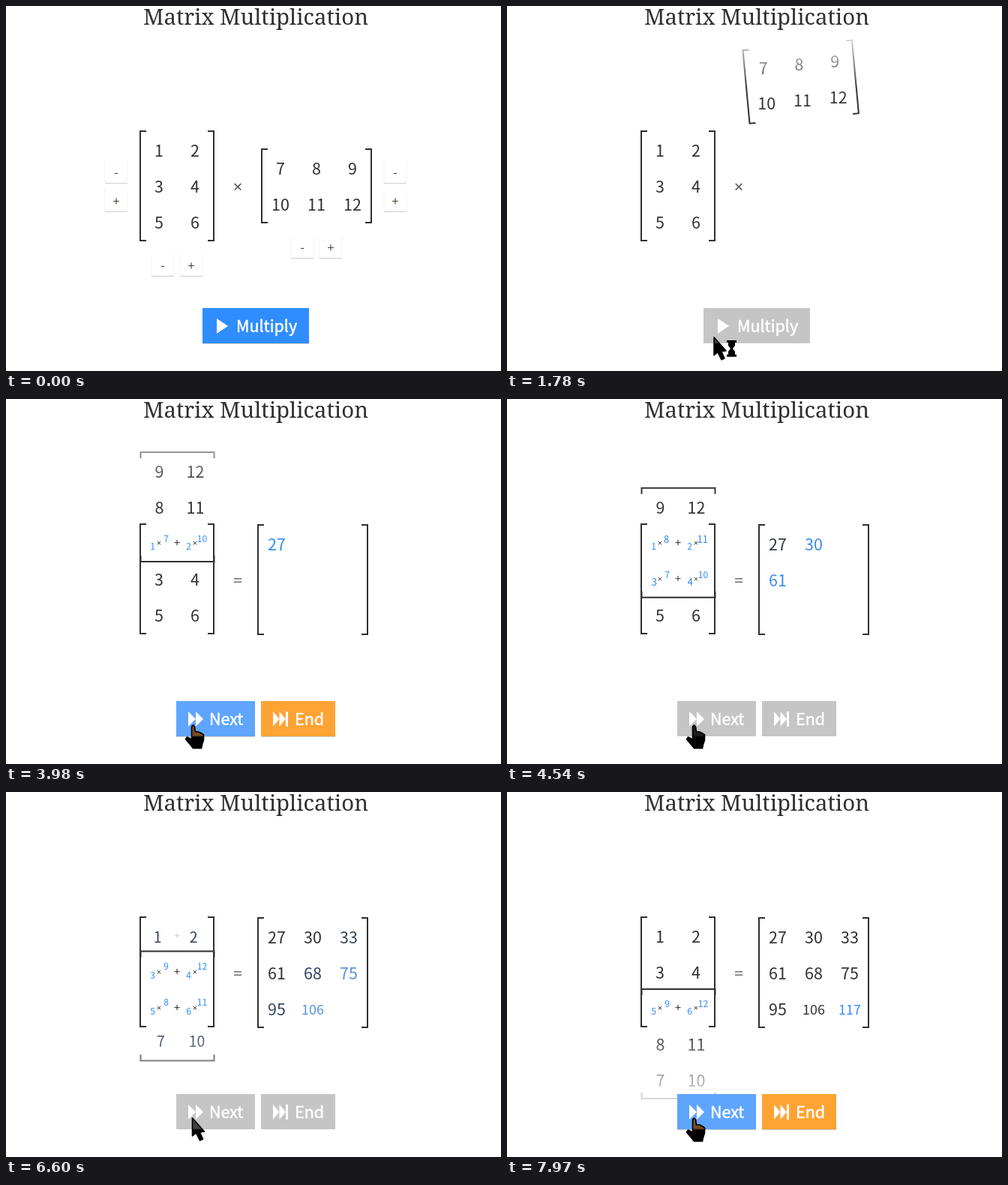
Recreate the animation shown at these times as an HTML page with a canvas. Size 660 by 487 pixels, loop 8000 ms.

```html
<!DOCTYPE html>
<html lang="en">
<head>
<meta charset="utf-8">
<title>Matrix Multiplication</title>
<style>
html, body { margin: 0; height: 100%; overflow: hidden; background: #fff; }
canvas { display: block; }
</style>
</head>
<body>
<canvas id="stage" width="660" height="487"></canvas>
<script>
const ctx = document.getElementById('stage').getContext('2d');
const LOOP = 8000;
const SANS = '"Noto Sans CJK JP", "Noto Sans CJK SC", "Noto Sans CJK", "Noto Sans", sans-serif';
const SIGN = '"Noto Sans", sans-serif';
const DARK = [48, 48, 50], BLUE = [47, 141, 255], HOVER = [94, 165, 255];
const GRAY = [197, 197, 197], ORANGE = [255, 163, 50];
const A = [[1, 2], [3, 4], [5, 6]];
const B = [[7, 8, 9], [10, 11, 12]];
const STEPS = [2820, 3980, 5080, 6110, 7210];
const CLICK = 780;

const clamp = v => Math.min(1, Math.max(0, v));
const ramp = (t, start, length) => clamp((t - start) / length);
const mix = (a, b, p) => a + (b - a) * p;
const quad = u => u < .5 ? 2 * u * u : 1 - 2 * (1 - u) ** 2;
const cubic = u => u < .5 ? 4 * u ** 3 : 1 - 4 * (1 - u) ** 3;
const easeOut = u => 1 - (1 - u) ** 2;
const tint = (a, b, p) => a.map((v, i) => Math.round(mix(v, b[i], p)));
const rgb = (c, alpha = 1) => `rgba(${c},${alpha})`;

function text(s, x, y, size, color, font = SANS, align = 'center') {
  const scale = font === SANS ? .895 : 1;
  ctx.font = `${size * scale}px ${font}`;
  ctx.textAlign = align;
  ctx.fillStyle = color;
  ctx.fillText(s, x, y + size * .33);
}

function path(points, x = 0, y = 0) {
  ctx.beginPath();
  points.forEach(([px, py]) => ctx.lineTo(x + px, y + py));
}

// Square brackets around a w by h box, turned by angle
function brackets(cx, cy, w, h, angle, color) {
  ctx.strokeStyle = color;
  ctx.lineWidth = 2;
  const c = Math.cos(angle), s = Math.sin(angle);
  for (const side of [-1, 1]) {
    const out = side * (w / 2 - 1), tip = side * (w / 2 - 9), v = h / 2 - 1;
    path([[tip, -v], [out, -v], [out, v], [tip, v]]
      .map(([x, y]) => [x * c - y * s, x * s + y * c]), cx, cy);
    ctx.stroke();
  }
}

// Colour that dissolves towards the top and bottom of the stage
function dissolve(color) {
  const g = ctx.createLinearGradient(0, 0, 0, 430);
  [[0, 0], [18, .06], [45, .2], [110, .96], [150, 1], [314, 1], [430, 0]]
    .forEach(([y, a]) => g.addColorStop(y / 430, rgb(color, a)));
  return g;
}

// How far a cell is covered, given its first and last covered step
function coverage(first, last, step, p) {
  const on = n => +(n >= first && n <= last);
  return mix(on(step - 1), on(step), p);
}

function sizeButtons(alpha) {
  if (!alpha) return;
  ctx.globalAlpha = alpha;
  const pair = (x, y, dx, dy) => ['-', '+'].forEach((s, i) => {
    const px = x + dx * i, py = y + dy * i;
    ctx.fillStyle = '#f2f2f2';
    ctx.fillRect(px - .5, py, 31, 29);
    ctx.fillStyle = '#fff';
    ctx.fillRect(px + .5, py - 1, 29, 30);
    ctx.fillStyle = '#cfcfcf';
    ctx.fillRect(px, py + 29, 30, 1);
    text(s, px + 15, py + 15, 18, '#4c4634');
  });
  pair(132, 207, 0, 38);
  pair(194, 331, 38, 0);
  pair(504, 207, 0, 38);
  pair(380, 307, 38, 0);
  ctx.globalAlpha = 1;
}

function button(x, w, label, labelX, color, active) {
  ctx.fillStyle = rgb([0, 0, 0], .22 * active);
  ctx.fillRect(x, 450, w, 1);
  ctx.fillStyle = rgb(color);
  ctx.fillRect(x, 403, w, 47);
  text(label, labelX, 427, 24, '#fff', SANS, 'left');
  // A thin outline gives the label a medium weight
  ctx.strokeStyle = '#fff';
  ctx.lineWidth = .5;
  ctx.strokeText(label, labelX, 427 + 24 * .33);
}

function arrowheads(x, w, count) {
  for (let i = 0; i < count; i++) {
    path([[0, 417], [w, 427], [0, 437]], x + i * w);
    ctx.fill();
  }
}

function buttons(t, start) {
  if (t < 2400) {
    const off = ramp(t, CLICK, 100);
    const live = tint(BLUE, HOVER, ramp(t, 640, 80));
    button(262, 142, 'Multiply', 307, tint(live, GRAY, off), 1 - off);
    arrowheads(281, 15, 1);
    return;
  }
  const since = t - start;
  const first = start === STEPS[0];
  const on = since < 0 ? 0 : Math.max(ramp(since, 600, 100), first ? 0 : 1 - ramp(since, 0, 70));
  button(227, 105, 'Next', 271, tint(GRAY, HOVER, on), on);
  arrowheads(243, 10, 2);
  button(340, 99, 'End', 385, tint(GRAY, ORANGE, on), on);
  arrowheads(356, 8.5, 2);
  ctx.fillRect(373, 417, 3, 20);
}

const ARROW = [[1, 0], [1, 24], [6, 20], [11, 30], [15, 28], [11, 19], [17, 18]];
const HAND = [[0, 2], [2, 0], [4, 2], [5, 9], [9, 9], [13, 11], [16, 13], [16, 20],
  [14, 26], [13, 31], [2, 31], [-2, 26], [-8, 19], [-6, 16], [-2, 18], [0, 20]];

function cursor(t, start) {
  if (t < 400) return;
  const enter = easeOut(ramp(t, 390, 330)), shift = quad(ramp(t, 2450, 320));
  const x = mix(mix(400, 275, enter), 247.5, shift);
  const y = mix(mix(487, 442, enter), 435, shift);
  const since = t - start;
  const early = t < STEPS[0];
  const hand = early ? t > 640 && t < 900 : since > 530 || (start !== STEPS[0] && since < 70);
  const live = early ? t < 840 : since > 610 || since < 70;
  const fill = ctx.createLinearGradient(0, 449, 0, 451);
  fill.addColorStop(0, hand ? (live ? '#7b4a20' : '#1c1c1c') : '#424242');
  fill.addColorStop(1, '#000');
  path(hand ? HAND : ARROW, x, y);
  ctx.closePath();
  ctx.lineJoin = 'round';
  ctx.lineWidth = 1.6;
  ctx.fillStyle = fill;
  ctx.strokeStyle = '#000';
  ctx.fill();
  ctx.stroke();
  ctx.lineJoin = 'miter';
  if (!hand && t > 900 && t < 3350) {
    ctx.fillStyle = '#000';
    ctx.fillRect(x + 18, y + 4, 13, 3);
    ctx.fillRect(x + 18, y + 23, 13, 3);
    path([[20, 7], [29, 7], [29, 11], [26, 15], [29, 19], [29, 23],
      [20, 23], [20, 19], [23, 15], [20, 11]], x, y);
    ctx.fill();
  }
}

function leftMatrix(step, p) {
  brackets(228, 240, 100, 148, 0, rgb(DARK));
  A.forEach((row, i) => {
    const q = coverage(i + 1, i + 3, step, p), y = 193 + 48 * i;
    row.forEach((n, j) => {
      const x = 204 + 48 * j;
      text(n, x - 8.5 * q, y + 4 * q, mix(24, 13.5, q), rgb(tint(DARK, BLUE, q)));
      text('×', x, y - 1, 11, rgb(DARK, q), SIGN);
    });
    text('+', 228, y - 1, 15, rgb(DARK, q), SIGN);
  });
}

function movingMatrix(t, step, p) {
  const lift = cubic(ramp(t, 820, 600)), u = ramp(t, 1580, 820);
  const turn = cubic(u), angle = -Math.PI / 2 * turn;
  const cx = mix(414, 228.5, quad(u));
  let cy = mix(mix(240, 102, lift), 88, turn);
  STEPS.forEach((s, i) => cy += (i ? 48 : 56) * cubic(ramp(t, s, 640)));
  brackets(cx, cy, 148, 100, angle, dissolve(DARK));
  const c = Math.cos(angle), s = Math.sin(angle);
  B.forEach((row, i) => row.forEach((n, j) => {
    const dx = 48 * (j - 1), dy = 48 * i - 24;
    const q = coverage(j + 1, j + 3, step, p);
    text(n, cx + dx * c - dy * s + 9 * q, cy + 1 + dx * s + dy * c - 6.5 * q,
      mix(24, 13.5, q), dissolve(tint(DARK, BLUE, q)));
  }));
}

function product(t, step, p) {
  const shown = ramp(t, 2650, 430);
  if (!shown) return;
  ctx.globalAlpha = shown;
  brackets(409, 241, 148, 148, 0, rgb(DARK));
  A.forEach((row, i) => B[0].forEach((_, j) => {
    const n = i + j + 1;
    const alpha = n === 1 ? 1 : ramp(t, STEPS[n - 1], 600);
    const value = row[0] * B[0][j] + row[1] * B[1][j];
    const color = tint(DARK, BLUE, coverage(n, n, step, p));
    text(value, 361 + 48 * j, 194 + 48 * i, value > 99 ? 20 : 24, rgb(color, alpha));
  }));
  ctx.globalAlpha = 1;
}

function draw(t) {
  const step = STEPS.filter(s => t >= s).length;
  const start = STEPS[Math.max(0, step - 1)];
  const p = easeOut(ramp(t, start + 250, 450));
  ctx.fillStyle = '#fff';
  ctx.fillRect(0, 0, 660, 487);
  sizeButtons(1 - ramp(t, CLICK, 180));
  leftMatrix(step, p);
  movingMatrix(t, step, p);
  const equals = ramp(t, 2400, 300);
  text('×', 309, 242, 22, rgb([85, 85, 85], 1 - equals), SIGN);
  text('=', 309, 243, 22, rgb([115, 115, 115], equals), SIGN);
  product(t, step, p);
  ctx.font = '29.35px "Noto Serif", serif';
  ctx.textAlign = 'center';
  ctx.fillStyle = rgb(DARK);
  ctx.fillText('Matrix Multiplication', 333, 25);
  buttons(t, start);
  cursor(t, start);
}

const begin = performance.now();
function tick() {
  draw((performance.now() - begin) % LOOP);
  requestAnimationFrame(tick);
}
tick();
</script>
</body>
</html>
```
